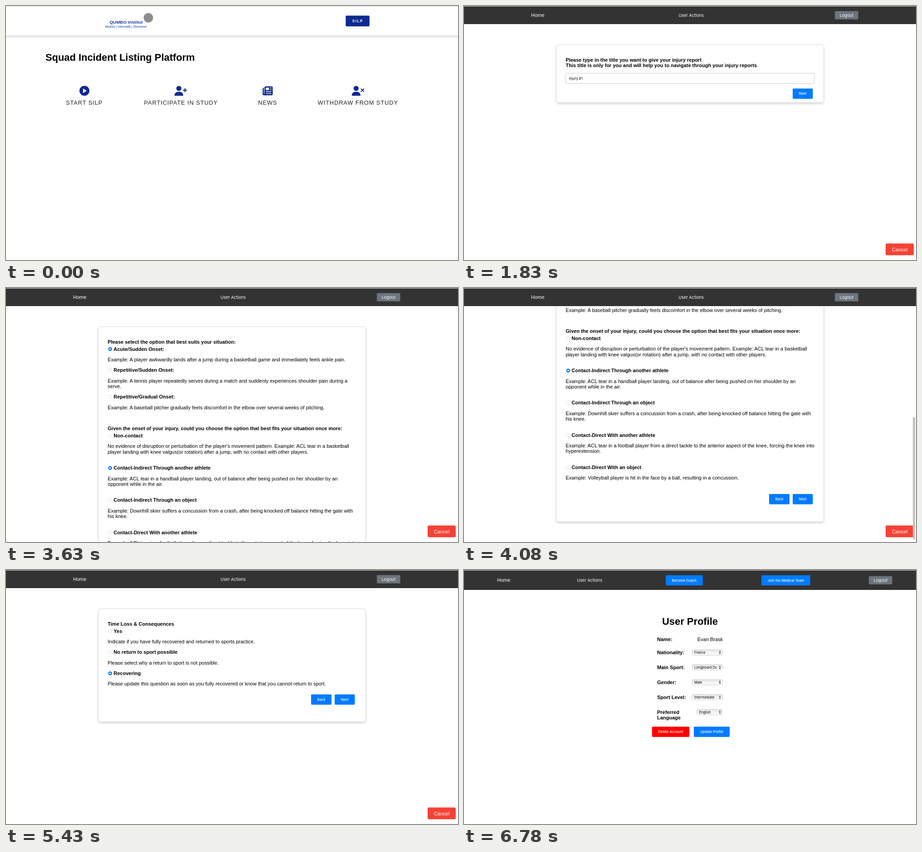
Animation, 997 px wide and 561 px high, one loop 7230 ms. Source, as an HTML page:

```html
<!DOCTYPE html>
<html lang="en">
<head>
<meta charset="utf-8">
<title>Injury reporting walkthrough</title>
<style>
  html, body { margin: 0; width: 100%; height: 100%; overflow: hidden; background: #fff; }
  svg { display: block; width: 997px; height: 561px; }
  text { font-family: "Liberation Sans", Arial, sans-serif; white-space: pre; }
  .bold { font-weight: 700; }
  .ui { font-family: Inter, sans-serif; }
  .button { font-family: Inter, sans-serif; font-weight: 500; }
  .menu { letter-spacing: .88px; }
</style>
</head>
<body>
<svg viewBox="0 0 997 561">
  <defs>
    <filter id="shadow" x="-5%" y="-10%" width="110%" height="125%">
      <feDropShadow dx="0" dy="2.7" stdDeviation="2.2" flood-opacity=".16"/>
    </filter>
    <linearGradient id="select" x2="0" y2="1">
      <stop stop-color="#e4e4e4"/><stop offset=".5" stop-color="#f4f4f4"/><stop offset="1" stop-color="#fafafa"/>
    </linearGradient>
    <clipPath id="value"><rect x="500" y="170" width="57" height="160"/></clipPath>
  </defs>
  <g id="screen"></g>
</svg>
<script>
const NAVY = '#0f2a90', BLUE = '#007bff', RADIO = '#0a7aff';
const APP = 'SILP', APP_NAME = 'Squad Incident Listing Platform';
const FIRST = 'Evan', LAST = 'Brask';

// y is the middle of the capital letters
const text = (x, y, str, size = 11, attrs = '') =>
  `<text x="${x}" y="${y + size * .36}" font-size="${size}" ${attrs}>${str}</text>`;
const bold = (x, y, str, size = 11, attrs = '') => text(x, y, str, size, 'class="bold" ' + attrs);
const small = (x, y, str, attrs = '') => text(x, y, str, 7.5, 'class="ui" ' + attrs);
const rect = (x, y, w, h, fill, r = 0, attrs = '') =>
  `<rect x="${x}" y="${y}" width="${w}" height="${h}" rx="${r}" fill="${fill}" ${attrs}/>`;
const circle = (x, y, r, fill, attrs = '') => `<circle cx="${x}" cy="${y}" r="${r}" fill="${fill}" ${attrs}/>`;
const path = (d, attrs) => `<path d="${d}" ${attrs}/>`;
const button = (x, y, w, label, fill = BLUE) => rect(x, y, w, 22.7, fill, 1.8) +
  text(x + w / 2, y + 11.5, label, 7.5, 'class="button" fill="#fff" text-anchor="middle"');
const field = (x, y, w, h, value = '') =>
  rect(x + .5, y + .5, w - 1, h - 1, '#fff', 2, 'stroke="#ccc"') + small(x + 7.8, y + h / 2 + .6, value);

// Navigation
const topLine = rect(0, 0, 997, 1.4, '#e2e2e2');
const navItems = (home, actions, logout, y) =>
  text(home, y - .3, 'Home', 11, 'fill="#fff"') +
  text(actions, y + .3, 'User Actions', 9.2, 'class="ui" fill="#fff" text-anchor="middle"') +
  rect(logout, y - 9.2, 51.6, 18.3, '#6c757d', 1.8) +
  text(logout + 25.8, y + .3, 'Logout', 9.2, 'class="ui" fill="#fff" text-anchor="middle"');
const darkBar = h => topLine + rect(0, 1, 997, h - 1, '#333');
const nav = darkBar(40) + navItems(148, 501, 818, 20.5);
const appHeader = topLine + bold(180.5, 30.5, APP, 26.5, 'fill="#333"') +
  bold(816, 31, APP_NAME, 13.15, 'fill="#333" text-anchor="end"') +
  rect(0, 60, 997, 4, '#e8e8e8') + rect(0, 64, 997, 2.5, '#f5f5f5');

// Icons around (x, 187)
const user = x => circle(x - 4, 182, 5.6, NAVY) +
  path(`M${x - 13.6} 198.2v-1a7.6 7.6 0 0 1 7.6-7.6h4a7.6 7.6 0 0 1 7.6 7.6v1z`, `fill="${NAVY}"`);
const strokes = (d, color = NAVY, w = 2.1) =>
  path(d, `stroke="${color}" stroke-width="${w}" stroke-linecap="round" fill="none"`);
const icons = {
  play: x => circle(x, 187.3, 11, NAVY) + path(`M${x - 3} 182.3v10l8-5z`, 'fill="#fff"'),
  join: x => user(x) + strokes(`M${x + 5.9} 186h7.2m-3.6-3.6v7.2`),
  leave: x => user(x) + strokes(`M${x + 7.2} 183.3l5.4 5.4m0-5.4l-5.4 5.4`),
  news: x => rect(x - 11.3, 180.2, 10, 17, NAVY, 3) + rect(x - 8.6, 178, 1.4, 15.6, '#fff') +
    rect(x - 7.2, 177.4, 18.2, 19.8, NAVY, 2.8) + rect(x - 4.4, 180.2, 7, 5.6, '#fff', .8) +
    strokes(`M${x + 5.2} 181h2.6m-2.6 4h2.6m-11.6 4.2h11.6m-11.6 4.2h11.6`, '#fff', 1.4)
};
const menuItem = (icon, iconX, x, label) =>
  icons[icon](iconX) + text(x, 213, label, 12.9, 'class="menu" fill="#222"');

// Report cards
const cancel = rect(930, 524.4, 62, 26, '#f44336', 3) +
  text(961, 537.6, 'Cancel', 11, 'fill="#fff" text-anchor="middle"');
const cardBox = bottom =>
  rect(203.5, 85.5, 590, bottom - 85.5, '#fff', 5, 'stroke="#ddd" filter="url(#shadow)"');
const card = (bottom, content) => cardBox(bottom) + content + nav + cancel;
const backNext = (y, next = 'Next') => button(673, y, 45, 'Back') + button(725, y, 44.4, next);
const radio = (y, label, on, ...lines) =>
  circle(229.7, y + .3, on ? 4.3 : 4, on ? RADIO : '#fff', on ? '' : 'stroke="#d4d4d4" stroke-width=".7"') +
  (on ? circle(229.7, y + .3, 1.8, '#fff') : '') + bold(237.3, y, label) +
  lines.map((line, i) => text(224.3, y + 23.4 + i * 12.3, line)).join('');
const heading = (str, y = 118.8) => bold(224.3, y, str);

const dropdown = (x, y, w, value) =>
  rect(x + .5, y - 6, w - 1, 12, 'url(#select)', 3, 'stroke="#c4c4c4" stroke-width=".8"') +
  small(x + 5.5, y + .4, value, w < 100 ? 'clip-path="url(#value)"' : '') +
  path(`M${x + w - 8.6} ${y - .8}l2-2.6 2 2.6zm0 1.8l2 2.6 2-2.6z`, 'fill="#222"');
const checkbox = (x, y) => rect(x, y, 8.2, 8.2, RADIO, 1.6) +
  path(`M${x + 2} ${y + 4.3}l1.6 1.8 2.7-4`, 'stroke="#fff" stroke-width="1.2" fill="none"');
const dots = y => Array.from({ length: 11 }, (_, i) => circle(394.5 + i * 4.82, y, 1.9, '#000')).join('');

const landing = topLine + rect(0, 65, 997, 3, '#e5e5e5') + rect(0, 68, 997, 3.5, '#f4f4f4') +
  circle(314, 26, 10.5, '#8c8c8c') +
  bold(228.5, 35, 'QUMBO Institut', 9.8, 'fill="#1a3da5"') +
  text(218.5, 45.2, 'Medizin | Informatik | Ökonomie', 6.55, 'fill="#1a3da5"') +
  rect(749.3, 21.2, 52.5, 23.8, NAVY, 2) +
  bold(775.8, 33.3, APP, 8.3, 'fill="#fff" letter-spacing="1.4" text-anchor="middle"') +
  bold(87, 112.8, APP_NAME, 21.9) +
  menuItem('play', 173, 132, 'START ' + APP) + menuItem('join', 385.3, 304.5, 'PARTICIPATE IN STUDY') +
  menuItem('news', 577.3, 556, 'NEWS') + menuItem('leave', 776.3, 687.5, 'WITHDRAW FROM STUDY');

const consent = appHeader + bold(224.3, 113.5, 'Terms of Use', 13) + [
  'Thank you for your interest in taking part in this study on injuries in sport. Please read the',
  'following information carefully before you create your account.',
  '',
  'The aim of the study is to learn how injuries happen and how athletes recover from them.',
  'You will be asked to report each injury with a title, a date and a short description.',
  '',
  'Your participation is voluntary. You can withdraw from the study at any time and without',
  'giving any reason. There will be no disadvantage for you.',
  '',
  'Your data will be stored securely and used for scientific purposes only. All results will be',
  'published in a form that does not allow any conclusion about you as a person.',
  '',
  'You can update your reports and your profile whenever you want to.'
].map((line, i) => text(224.3, 143 + i * 22, line)).join('') +
  button(716, 470, 57, 'Register');

const register = appHeader + bold(384.3, 114.2, 'Register', 13) +
  field(384, 140.6, 228.5, 24.6, FIRST) + field(384, 178.6, 228.5, 24.4, LAST) +
  bold(384.3, 218.4, 'Date of') + bold(384.3, 230.6, 'Birth:') + field(453, 209, 159.5, 27.8) +
  small(462, 223.5, '01/01/1990', 'style="font-variant-numeric:tabular-nums" letter-spacing=".25"') +
  field(384, 249.7, 228.5, 24.6) + dots(262.4) + field(384, 287.4, 228.5, 24.3) + dots(299.9) +
  checkbox(386, 321.2) + bold(398.3, 324.7, 'I accept the ') +
  bold(462, 324.7, 'Terms of Use', 11, 'fill="#0000ee" text-decoration="underline"') +
  button(468.5, 348.7, 76.5, 'Back to Login') + button(552, 348.7, 57, 'Register');

const dashboard = nav + bold(102, 113, 'User Actions', 21.9) +
  menuItem('play', 152, 102, 'NEW REPORT') + menuItem('news', 385, 336, 'MY REPORTS') +
  menuItem('join', 612, 566, 'MY PROFILE') + menuItem('leave', 835, 790, 'WITHDRAW');

const onset =
  heading('Please select the option that best suits your situation:') +
  radio(134.6, 'Acute/Sudden Onset:', true,
    'Example: A player awkwardly lands after a jump during a basketball game and immediately feels ankle pain.') +
  radio(181.4, 'Repetitive/Sudden Onset:', false,
    'Example: A tennis player repeatedly serves during a match and suddenly experiences shoulder pain during a', 'serve.') +
  radio(240.4, 'Repetitive/Gradual Onset:', false,
    'Example: A baseball pitcher gradually feels discomfort in the elbow over several weeks of pitching.') +
  heading('Given the onset of your injury, could you choose the option that best fits your situation once more:', 310.2) +
  radio(326, 'Non-contact', false,
    "No evidence of disruption or perturbation of the player's movement pattern. Example: ACL tear in a basketball",
    'player landing with knee valgus(or rotation) after a jump, with no contact with other players.') +
  radio(397.2, 'Contact-Indirect Through another athlete', true,
    'Example: ACL tear in a handball player landing, out of balance after being pushed on her shoulder by an',
    'opponent while in the air.') +
  radio(468.4, 'Contact-Indirect Through an object', false,
    'Example: Downhill skier suffers a concussion from a crash, after being knocked off balance hitting the gate with',
    'his knee.') +
  radio(539.6, 'Contact-Direct With another athlete', false,
    'Example: ACL tear in a football player from a direct tackle to the anterior aspect of the knee, forcing the knee into',
    'hyperextension.') +
  radio(610.8, 'Contact-Direct With an object', false,
    'Example: Volleyball player is hit in the face by a ball, resulting in a concussion.') +
  backNext(670);
const onsetPage = scroll => `<g transform="translate(0 ${-scroll})">${cardBox(731)}${onset}</g>` + nav + cancel;

const profile = darkBar(44) + navItems(73, 277, 893, 22.6) +
  button(445, 11.4, 81.6, 'Become Coach') + button(656, 11.4, 107.7, 'Join the Medical Team') +
  bold(498.5, 113, 'User Profile', 21.9, 'text-anchor="middle"') +
  bold(426, 153, 'Name:') + text(571, 153, `${FIRST} ${LAST}`, 11, 'text-anchor="end"') +
  ['Nationality:France', 'Main Sport:Longboard Dancing', 'Gender:Male', 'Sport Level:Intermediate'].map((row, i) => {
    const [label, value] = row.split(':'), y = 182.2 + i * 32.9;
    return bold(426, y, label + ':') + dropdown(502.5, y, 68.5, value);
  }).join('') +
  bold(426, 313.8, 'Preferred') + bold(426, 326, 'Language') + dropdown(513, 313.8, 58, 'English') +
  button(414.7, 346, 82.5, 'Delete Account', '#f00') + button(507, 346, 79, 'Update Profile');

const screens = [
  landing, consent, register, dashboard,
  card(213, heading('Please type in the title you want to give your injury report') +
    heading('This title is only for you and will help you to navigate through your injury reports', 131.2) +
    field(224, 148, 549, 24, 'injury #1') + button(725, 182.2, 44.4, 'Next')),
  card(240, heading('When did your injury happen?') +
    field(224, 132, 159.5, 27.8, '01/01/2024') + backNext(180)),
  card(217, heading('Which sport were you practising?') +
    dropdown(224, 137, 120, 'Longboard Dancing') + backNext(157)),
  card(263, heading('Which part of your body is injured?') + dropdown(224, 137, 120, 'Knee') +
    heading('Which side of your body is injured?', 162) + dropdown(224, 180, 120, 'Left') + backNext(203)),
  onsetPage(0),
  onsetPage(215) + rect(990, 285, 5, 270, '#c1c1c1', 2.5),
  card(248.5, heading('Please shortly describe how your injury happened') +
    rect(224.5, 128.8, 552, 39.3, '#fff', 0, 'stroke="#858585"') + small(226.3, 136, 'A fall on my knee') +
    path('M771 167l4.5-4.5m-2 4.5l2-2', 'stroke="#777" stroke-width=".7"') + backNext(188.3)),
  card(335, heading('Medical Attention') +
    radio(134.6, 'Yes', true, 'Indicate if you have seen a doctor because of your injury.') +
    radio(181.4, 'No', false, 'Please select this option if no treatment was needed.') +
    radio(228, 'Not yet', false, 'Please update this question as soon as you have seen a doctor.') + backNext(274.8)),
  card(335, heading('Time Loss &amp; Consequences') +
    radio(134.6, 'Yes', false, 'Indicate if you have fully recovered and returned to sports practice.') +
    radio(181.4, 'No return to sport possible', false, 'Please select why a return to sport is not possible.') +
    radio(228, 'Recovering', true,
      'Please update this question as soon as you fully recovered or know that you cannot return to sport.') +
    backNext(274.8)),
  card(217, heading('Thank you for completing your injury report') + backNext(157, 'Submit')),
  dashboard, profile
];

const LOOP = 7230, FIRST_HOLD = 480, HOLD = 450;
const stage = document.getElementById('screen');
let shown = -1;
function draw() {
  const t = performance.now() % LOOP;
  const index = t < FIRST_HOLD ? 0 : 1 + Math.floor((t - FIRST_HOLD) / HOLD);
  if (index !== shown) stage.innerHTML = screens[shown = index];
  requestAnimationFrame(draw);
}
draw();
</script>
</body>
</html>
```
